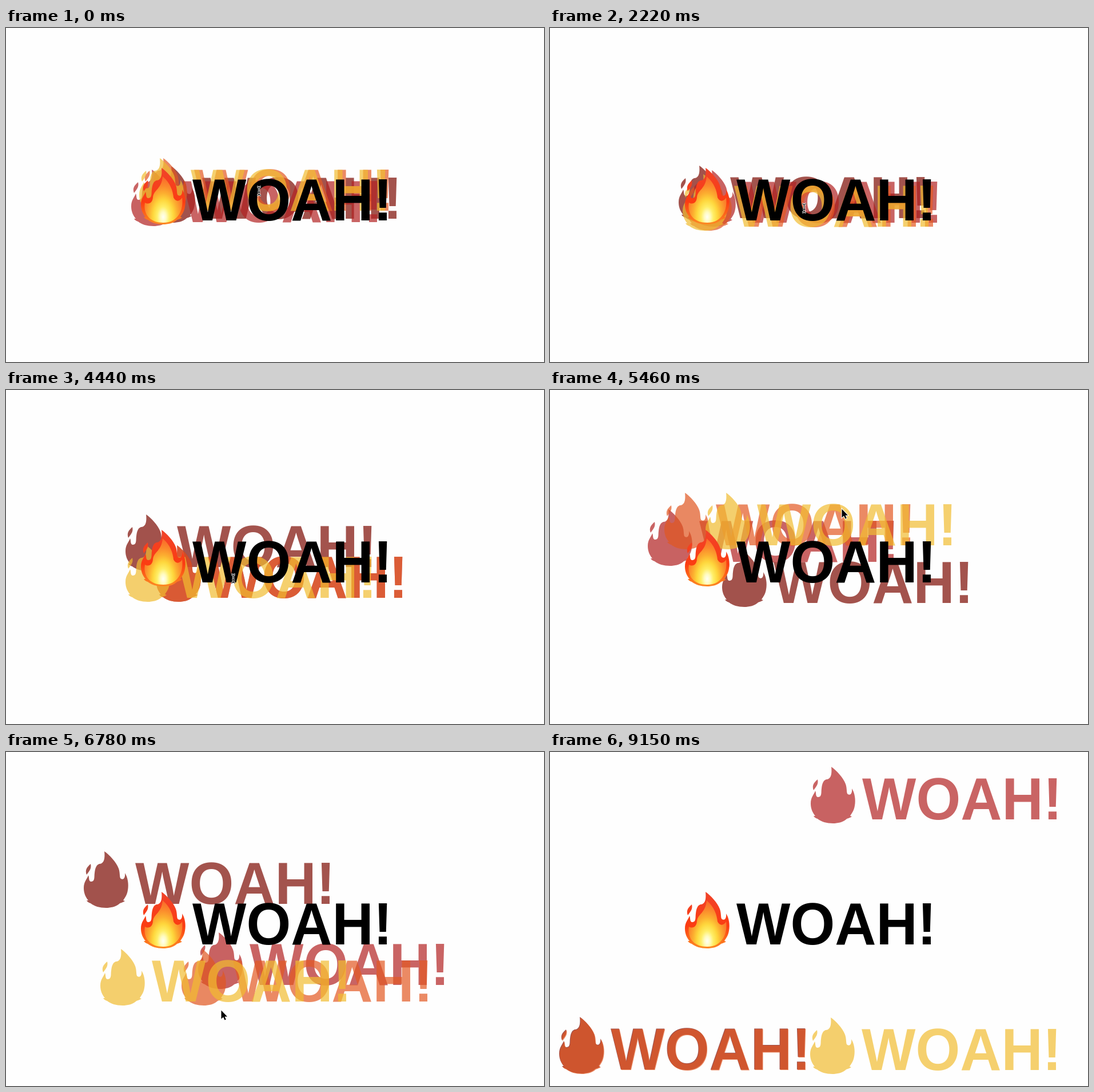
Write an HTML page with a canvas that moves like this. It is 941x585 px and loops after 9.3 s.

```html
<!DOCTYPE html>
<html lang="en">
<head>
<meta charset="utf-8">
<title>Mouse shadow</title>
<style>
html, body { margin: 0; width: 100%; height: 100%; overflow: hidden; background: #fefefe; }
canvas { display: block; }
</style>
</head>
<body>
<canvas id="stage" width="941" height="585"></canvas>
<script>
const ctx = document.getElementById('stage').getContext('2d');
const LOOP = 9300;
const STEP = LOOP / 63;
const REST = [880, 1930]; // the mouse lies still

// Both the shadow and the mouse follow a spiral:
// time, shadow angle and radius, mouse angle and radius
const spiral = [
  [0, -100, 17.3, -114.8, 9.6],
  [880, -228.4, 12, -233.1, 13.3],
  [1930, -232, 14, -240, 14],
  [3260, -369.5, 6.1, -360, 5],
  [5460, -781, 74.3, -783, 67.3],
  [6780, -970.7, 127.1, -986.5, 114.9],
  [7830, -1048.5, 151.3, -1053.4, 165.5],
  [8260, -1035, 351, -1035, 370],
  [9150, -1034.87, 310.4, -1035, 370]
];

// Smooth curve through timed points, one value per column
function along(keys, t) {
  const last = keys.length - 1;
  if (t >= keys[last][0]) return keys[last].slice(1);
  const i = keys.findIndex(k => k[0] > t) - 1;
  const a = keys[i], b = keys[i + 1];
  const p = keys[Math.max(i - 1, 0)], q = keys[Math.min(i + 2, last)];
  const span = b[0] - a[0], u = (t - a[0]) / span;
  return a.map((v, k) => {
    const m = (b[k] - p[k]) / (b[0] - p[0]) * span;
    const n = (q[k] - v) / (q[0] - a[0]) * span;
    const d = b[k] - v;
    return v + u * (m + u * (3 * d - 2 * m - n + u * (m + n - 2 * d)));
  }).slice(1);
}

function polar(deg, r) {
  const a = deg * Math.PI / 180;
  return [r * Math.cos(a), r * Math.sin(a)];
}

const body = new Path2D(`M272 245 C281 251 293 264 297 275 C300 283 298 291 301 293
  C306 296 309 290 308 283 C313 290 315 303 313 313 C312 321 308 326 305 331 L308 332
  C304 335 300 335 298 337 C292 342 283 344 275 344 C264 344 254 341 248 336
  C245 335 243 334 241 331 L244 331 C239 325 236 318 236 309 C236 298 242 293 244 287
  C246 291 244 298 249 298 C256 298 254 289 255 283 C256 274 258 269 263 267
  C269 267 274 262 272 245 Z`);
const spark = new Path2D('M248 267 C250 275 246 279 241 286 C238 278 241 273 248 267 Z');
const core = new Path2D(`M274 260 C288 272 292 286 293 297 C297 305 304 304 308 297
  C311 317 302 341 275 341 C248 341 240 322 243 306 C250 310 256 306 257 297
  C258 283 272 283 274 260 Z`);

function word() {
  ctx.save();
  ctx.translate(326, 337);
  ctx.scale(1, 1.046); // taller capitals
  ctx.font = 'bold 100px "Liberation Sans", Arial, sans-serif';
  ctx.fontKerning = 'none';
  ctx.fillText('WOAH!', 0, 0);
  ctx.restore();
}

function shadow(x, y, color) {
  ctx.save();
  ctx.translate(Math.round(x), Math.round(y));
  ctx.globalAlpha = .7;
  ctx.fillStyle = color;
  ctx.fill(body);
  ctx.fill(spark);
  word();
  ctx.restore();
}

function blend(gradient, ...stops) {
  for (const [at, color] of stops) gradient.addColorStop(at, color);
  return gradient;
}

function fire() {
  ctx.save();
  ctx.fillStyle = blend(ctx.createLinearGradient(0, 245, 0, 344),
    [0, '#f0432a'], [.6, '#fb3c12'], [1, '#fd8a22']);
  ctx.fill(spark);
  ctx.fill(body);
  ctx.clip(core);
  ctx.translate(275, 331);
  ctx.scale(.6, 1);
  ctx.fillStyle = blend(ctx.createRadialGradient(0, 0, 0, 0, 0, 72),
    [0, '#fffff4'], [.12, '#fffbc0'], [.25, '#ffee66'], [.42, '#fed63c'],
    [.58, '#fcae30'], [.75, '#fb8a2c'], [1, '#f9642a']);
  ctx.fillRect(-80, -80, 160, 100);
  ctx.restore();
}

const arrow = new Path2D('M0 0 V15 L3.5 11.8 L6 17 L8.3 16 L6 11 H10.5 Z');
const beam = new Path2D(`M-3.5 -7.5 Q0 -7.5 0 -4.5 Q0 -7.5 3.5 -7.5 M0 -5 V5 M-2 2 H2
  M-3.5 7.5 Q0 7.5 0 4.5 Q0 7.5 3.5 7.5`);

function cursor(x, y) {
  const overText = y > 242 && y < 350 && x > 232 && x < 680;
  ctx.save();
  ctx.translate(Math.round(x) + .5, Math.round(y) + .5);
  ctx.strokeStyle = '#fff';
  ctx.lineWidth = overText ? 3.2 : 2;
  ctx.stroke(overText ? beam : arrow);
  if (overText) {
    ctx.strokeStyle = '#000';
    ctx.lineWidth = 1.2;
    ctx.stroke(beam);
  } else {
    ctx.fillStyle = '#000';
    ctx.fill(arrow);
  }
  ctx.restore();
}

function draw(t) {
  const [angle, radius, mouseAngle, mouseRadius] = along(spiral, t);
  const [x, y] = polar(angle, radius);
  const [mx, my] = polar(mouseAngle, mouseRadius);
  ctx.fillStyle = '#fefefe';
  ctx.fillRect(0, 0, 941, 585);
  shadow(-y, x, '#7c0a02');
  shadow(y, -x, '#b22222');
  shadow(-x, y, '#e25822');
  shadow(x, y, '#f1bc31');
  fire();
  ctx.fillStyle = '#000';
  word();
  cursor(450 + mx * 2, 298 + my * 1.5);
}

// Redraws come in even steps
function tick(ms) {
  const t = Math.round(Math.floor((ms + 8) / STEP) * STEP);
  return t > REST[0] && ms < REST[1] ? REST[0] : t;
}

const start = performance.now();
function frame() {
  draw(tick((performance.now() - start) % LOOP));
  requestAnimationFrame(frame);
}
frame();
</script>
</body>
</html>
```
